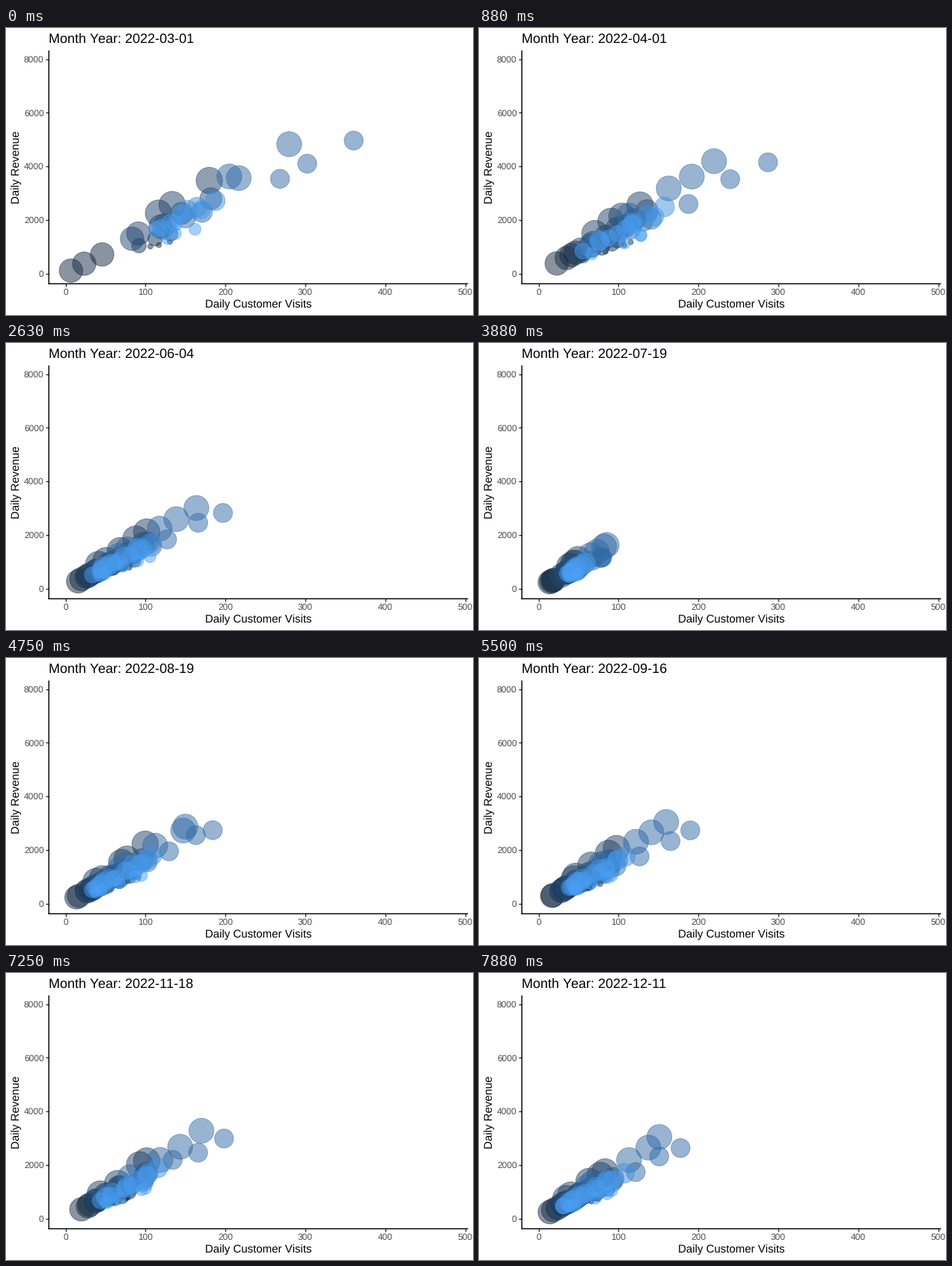
A matplotlib script for the animation above (8 s loop, 624 by 384 pixels).

```python
import matplotlib.pyplot as plt
import numpy as np
from matplotlib.animation import FuncAnimation

W, H, DPI = 624, 384, 96
PT = 72 / DPI
FRAMES, INTERVAL = 64, 125
DAYS_PER_FRAME = 448 / 99
START = np.datetime64("2022-03-01")
LEFT, RIGHT, TOP, BOTTOM = 57.3, 616.7, 30.8, 342.2
X0, X_UNIT = 79.5, 1.068
Y0, Y_UNIT = 328.5, 0.035875
DARK, BRIGHT = np.array([22, 43, 68]) / 255, np.array([74, 160, 246]) / 255

# radius in px, shade, visits relative to the busiest store, revenue per visit
STORES = [
    (16, 0, 0.19, 17),
    (3.7, 0.03, 0.42, 10),
    (10, 0.06, 0.42, 12.4),
    (18, 0.2, 0.49, 21),
    (16, 0.24, 0.37, 17),
    (15, 0.34, 0.5, 17),
    (17, 0.54, 0.84, 18.9),
    (13, 0.55, 1, 14.8),
    (14, 0.58, 0.52, 15),
    (13.5, 0.86, 0.59, 16.5),
    (12.5, 0.93, 0.53, 16),
    (11, 0.96, 0.43, 15.5),
    (8.3, 1, 0.52, 11.3),
]

rng = np.random.default_rng(7)
days = np.arange(int(FRAMES * DAYS_PER_FRAME) + 4)


def busiest_level():
    """Visits to the busiest store: Saturday trend times weekday share."""
    saturday = np.interp(days, [0, 4, 32, 60, 95, 200, 235, 284],
                         [363, 479, 282, 235, 195, 188, 228, 175])
    share = np.array([0.42, 0.4, 0.43, 0.67, 1, 0.86, 0.35])[days % 7]
    holiday = np.exp(-days / 1.8)
    return saturday * (share + (1 - share) * holiday)


def store_days(share, price, level):
    """Daily visits and revenue; smaller stores swing less than the busiest."""
    damping = 1 if share == 1 else 0.83
    visits = share * 190 * (level / 190) ** damping
    visits *= rng.normal(1, 0.07 * (1.3 - share), days.size)
    spring_discount = 1 - 0.1 * np.exp(-days / 20)
    revenue = visits * price * spring_discount * rng.normal(1, 0.025, days.size)
    return np.column_stack([visits, revenue])


level = busiest_level()
data = np.array([store_days(share, price, level) for _, _, share, price in STORES])
# The newest store opens gradually.
data[0] *= np.minimum(1, ((days + 1) / 3) ** 2)[:, None]

radii = np.array([s[0] for s in STORES])
areas = (2 * (radii - 0.3) * PT) ** 2
shades = np.array([s[1] for s in STORES])[:, None]
colors = np.hstack([DARK + (BRIGHT - DARK) * shades, np.full_like(shades, 0.5)])

plt.rcParams.update({"font.family": "Liberation Sans", "text.hinting": "none",
                     "text.hinting_factor": 1, "path.snap": False})
fig = plt.figure(figsize=(W / DPI, H / DPI), dpi=DPI, facecolor="white")
ax = fig.add_axes([LEFT / W, 1 - BOTTOM / H, (RIGHT - LEFT) / W, (BOTTOM - TOP) / H])
ax.set_xlim((LEFT - X0) / X_UNIT, (RIGHT - X0) / X_UNIT)
ax.set_ylim((Y0 - BOTTOM) / Y_UNIT, (Y0 - TOP) / Y_UNIT)
ax.spines[["top", "right"]].set_visible(False)
ax.spines[["left", "bottom"]].set_linewidth(1.07)
ax.set_xticks(range(0, 501, 100))
ax.set_yticks(range(0, 8001, 2000))
ax.tick_params(length=2.75, width=1.07, color="#333333",
               labelbottom=False, labelleft=False)


def label(x, y, text, size, color="black", **kw):
    return fig.text(x / W, 1 - y / H, text, fontsize=size, color=color, **kw)


for tick in ax.get_xticks():
    label(X0 + tick * X_UNIT, 357, f"{tick:.0f}", 8.8, "#4d4d4d", ha="center")
for tick in ax.get_yticks():
    label(50.6, Y0 - tick * Y_UNIT + 4.2, f"{tick:.0f}", 8.8, "#4d4d4d", ha="right")
label((LEFT + RIGHT) / 2, 374, "Daily Customer Visits", 11, ha="center")
label(18, (TOP + BOTTOM) / 2, "Daily Revenue", 11, rotation=90,
      ha="center", va="baseline", rotation_mode="anchor")
title = label(LEFT - 0.3, 20, "", 13.2)

bubbles = ax.scatter([], [], linewidths=0.71, zorder=3)


def draw(i):
    title.set_text(f"Month Year: {START + int(i * DAYS_PER_FRAME)}")
    shown = np.round(days / DAYS_PER_FRAME) == i
    n = shown.sum()
    rgba = np.repeat(colors, n, axis=0)
    bubbles.set_offsets(data[:, shown].reshape(-1, 2))
    bubbles.set_sizes(np.repeat(areas, n), DPI)
    bubbles.set_facecolors(rgba)
    bubbles.set_edgecolors(rgba)
    return bubbles, title


anim = FuncAnimation(fig, draw, frames=FRAMES, interval=INTERVAL,
                     repeat=True, repeat_delay=0, blit=False)
plt.show()
```
